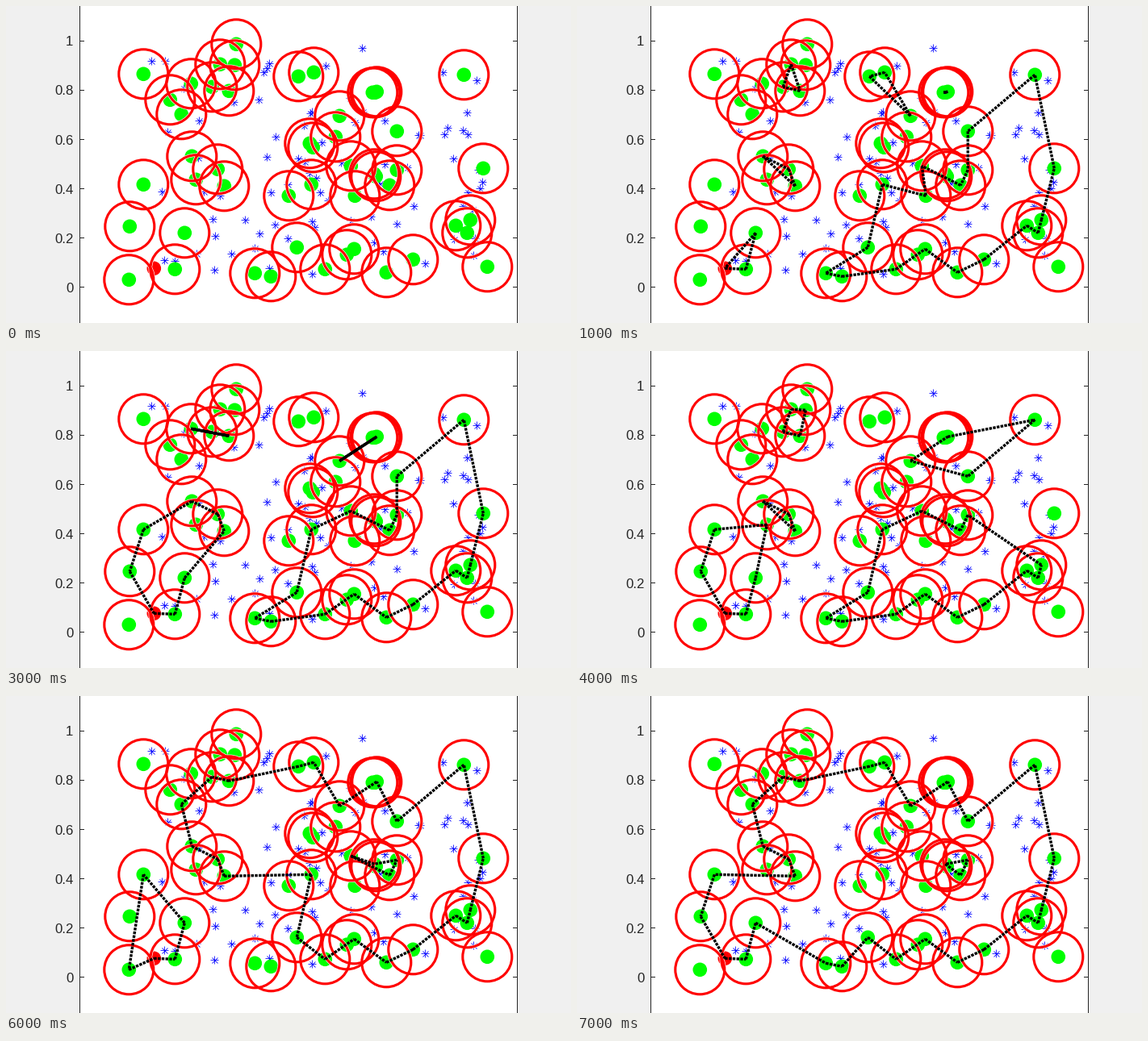
A matplotlib script for the animation above (8000 ms loop, 700 px wide and 393 px high).

```python
import numpy as np
import matplotlib.pyplot as plt
from matplotlib.animation import FuncAnimation
from matplotlib.patches import Circle, Rectangle

W, H, DPI = 700, 393, 100
PX = 72 / DPI  # points per pixel
LEFT, RIGHT = 91, 633
ZERO_Y, TICK_STEP = 348.3, 61.1
INK = "#262626"

# Key points: 0 is the depot, and 0-27 in order make the final full tour.
FULL_TOUR = [
    (183, 325), (209, 326), (221, 281), (308, 331), (328, 335), (360, 299),
    (395, 326), (431, 301), (471, 330), (504, 314), (557, 272), (571, 281),
    (575, 265), (591, 201), (567, 85), (484, 155), (459, 106), (413, 136),
    (381, 82), (362, 87), (276, 105), (255, 100), (217, 134), (230, 186),
    (262, 202), (270, 223), (170, 221), (153, 273),
]
# 28-39: stops that only the earlier solutions visit.
DETOURS = [
    (152, 339), (378, 221), (427, 198), (432, 235), (475, 222), (484, 203),
    (456, 208), (235, 215), (265, 72), (283, 73), (229, 96), (454, 107),
]
UNUSED = [
    (457, 107), (170, 84), (285, 47), (203, 116), (376, 170), (380, 175),
    (408, 162), (350, 235), (422, 308), (596, 323), (458, 211),
]
STOPS = np.array(FULL_TOUR + DETOURS + UNUSED) + 0.3


def span(a, b):
    return list(range(a, b + 1))


# Pieces shared between the successive solutions.
EAST = span(6, 15)
SOUTH = [29] + span(3, 5)[2:] + [3, 4]
WEST = [0, 1, 2, 25, 24, 23, 26, 27]
MID_WEST = span(23, 25)
TRIO = span(32, 34)
KITE = [17, 16, 14, 15]

SOLUTIONS = [
    [],
    [span(0, 2), [39, 16], [36, 20, 21], span(17, 19), MID_WEST,
     SOUTH + EAST + [33, 32, 30, 31]],
    [[0, 1, 2, 26, 27, 28], [21, 37, 20], KITE, MID_WEST + [35],
     span(29, 31), TRIO, span(10, 12), span(3, 5), [6, 7, 9, 8]],
    [WEST, [38, 20], [17, 16], SOUTH + EAST + [33, 32, 30]],
    [[0, 1, 2, 35, 26, 27], MID_WEST, [21, 36, 37, 20], KITE,
     SOUTH + span(6, 12) + [33, 32, 30]],
    [WEST + [28], span(20, 22), [17, 39, 16], [29, 5] + EAST + [33, 32, 30, 31]],
    [[0, 1, 2, 26, 28], [29] + span(5, 25), [30] + TRIO],
    [span(0, 27), TRIO],
]

fig = plt.figure(figsize=(W / DPI, H / DPI), dpi=DPI, facecolor="#f0f0f0")
ax = fig.add_axes([0, 0, 1, 1])
ax.set_xlim(0, W)
ax.set_ylim(H, 0)
ax.axis("off")


def box(x, y, w, h, color, z=1):
    ax.add_patch(Rectangle((x, y), w, h, fc=color, ec="none", zorder=z))


def draw_axes():
    box(LEFT, 0, RIGHT - LEFT + 1, H, "white", 0)
    for x in (LEFT, RIGHT):
        box(x, 0, 1, H, INK)
    for i in range(6):
        y = ZERO_Y - TICK_STEP * i
        box(LEFT, round(y), 6, 1, INK)
        box(RIGHT - 5, round(y), 6, 1, INK)
        ax.text(83.5, y + 6.5, f"{i / 5:g}", family="Liberation Sans",
                size=16.7 * PX, color=INK, ha="right", va="baseline")


def draw_customers():
    rng = np.random.default_rng(4)
    xs = rng.uniform(162, 597, 85)
    ys = rng.uniform(50, 336, 85)
    for marker, size in (("+", 10.5), ("x", 7)):
        ax.plot(xs, ys, marker, ms=size * PX, mew=0.8 * PX, color="blue", zorder=2)


def draw_stops():
    for i, p in enumerate(STOPS):
        ax.add_patch(Circle(p, 8.8, fc="lime" if i else "red", ec="none", zorder=3))
        if i:
            for color, width, z in (("white", 4.4, 4), ("red", 3.1, 5)):
                ax.add_patch(Circle(p, 30.5, fill=False, ec=color,
                                    lw=width * PX, zorder=z))


def draw_tour(tour):
    """Draw a closed tour, restarting the dots at every stop."""
    gap = np.full(2, np.nan)
    path = np.array([p for a, b in zip(tour, tour[1:] + tour[:1])
                     for p in (STOPS[a], STOPS[b], gap)])
    dots = "-" if len(tour) == 2 else (0, (1, 0.4))
    return ax.plot(*path.T, color="black", lw=3.4 * PX, ls=dots,
                   dash_capstyle="butt", solid_capstyle="butt", zorder=6)[0]


draw_axes()
draw_customers()
draw_stops()
steps = [[draw_tour(t) for t in tours] for tours in SOLUTIONS]


def update(frame):
    for s, lines in enumerate(steps):
        for line in lines:
            line.set_visible(s == frame)
    return [line for lines in steps for line in lines]


anim = FuncAnimation(fig, update, frames=len(SOLUTIONS), interval=1000,
                     repeat=True, repeat_delay=0, init_func=lambda: update(0))
plt.show()
```
